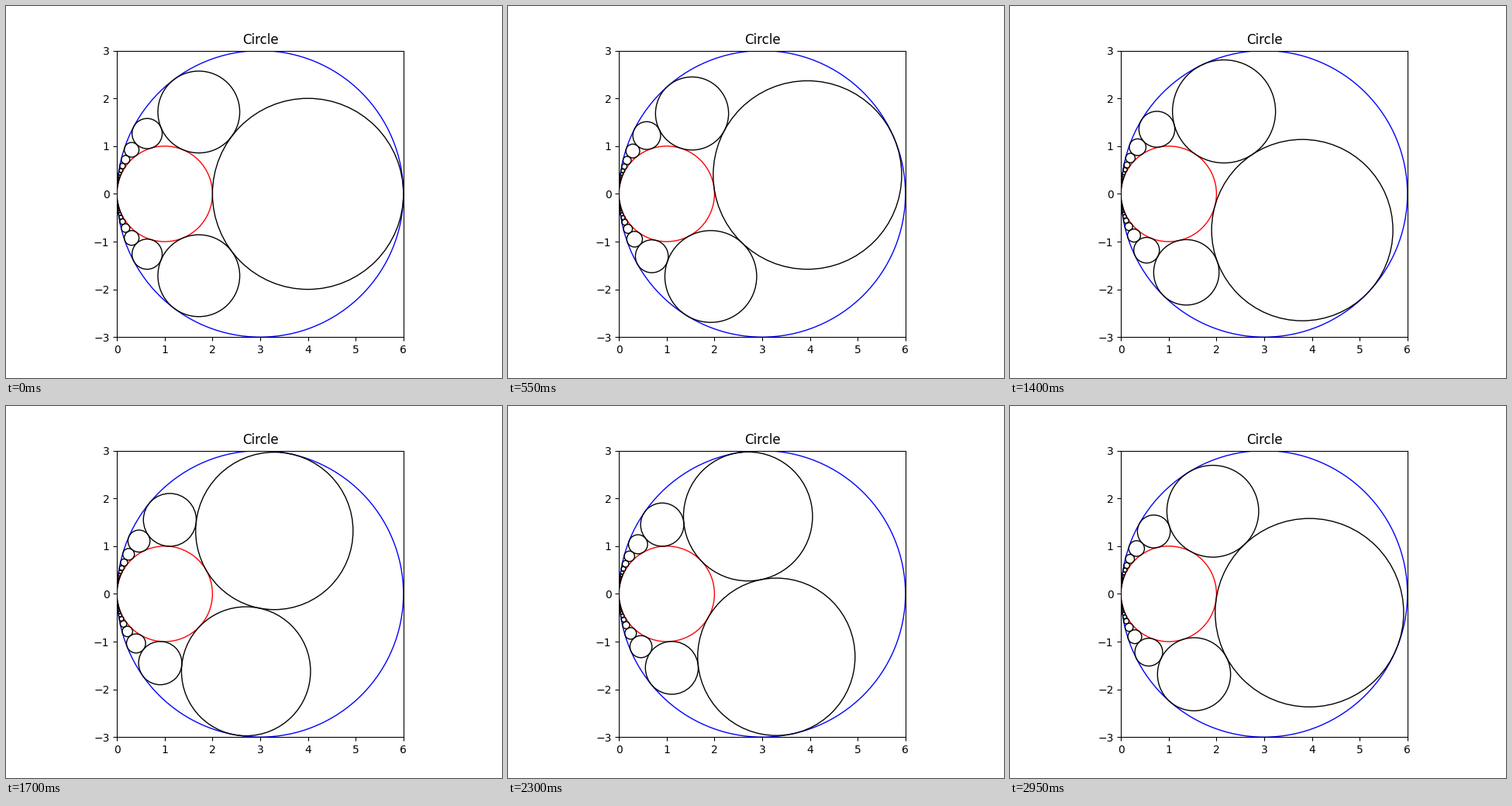
Write a matplotlib script that moves like this. It is 640 by 480 pixels and loops after 3000 ms.

```python
import matplotlib.pyplot as plt
from matplotlib.animation import FuncAnimation
from matplotlib.patches import Circle

FRAMES = 60
INTERVAL = 50
STEPS = 10          # frames for the chain to advance by one circle
REACH = 20          # circles on each side of the middle one
OUTER, INNER = 3, 1

# Inverting both circles about the origin gives two vertical lines;
# the chain is then a column of equal circles between them.
LEFT, RIGHT = 1 / (2 * OUTER), 1 / (2 * INNER)
MID, RAD = (LEFT + RIGHT) / 2, (RIGHT - LEFT) / 2


def invert(y):
    """Centre and radius of the image of the column circle at height y."""
    s = 1 / (MID**2 + y**2 - RAD**2)
    return (MID * s, y * s), RAD * s


fig, ax = plt.subplots(figsize=(6.4, 4.8), dpi=100)
ax.set_aspect("equal")
ax.set_xlim(0, 2 * OUTER)
ax.set_ylim(-OUTER, OUTER)
ax.set_title("Circle")


def add_circle(center, radius, color):
    return ax.add_patch(Circle(center, radius, fill=False, ec=color, lw=1))


add_circle((OUTER, 0), OUTER, "blue")
add_circle((INNER, 0), INNER, "red")
chain = [add_circle((0, 0), 0, "black") for _ in range(2 * REACH + 1)]


def update(frame):
    phase = frame % STEPS / STEPS
    for k, circle in enumerate(chain, -REACH):
        circle.center, circle.radius = invert(2 * RAD * (k + phase))
    return chain


anim = FuncAnimation(fig, update, frames=FRAMES, interval=INTERVAL,
                     repeat=True, repeat_delay=0)
plt.show()
```
